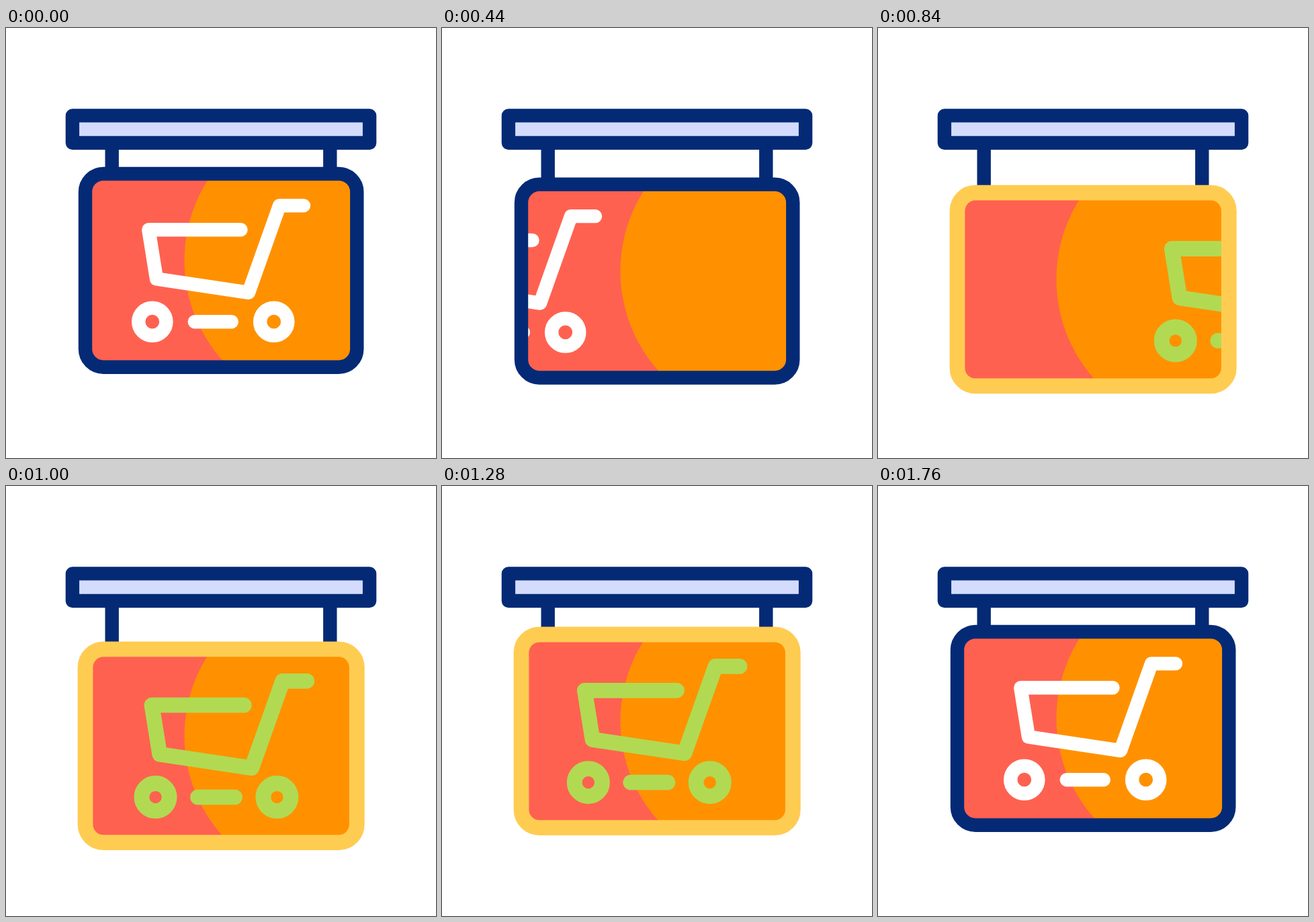
Recreate the animation shown at these times as an HTML page with a canvas. Size 640 px wide and 640 px high, loop 2160 ms.

```html
<!DOCTYPE html>
<html lang="en">
<head>
<meta charset="utf-8">
<title>Shop sign</title>
<style>
html, body { margin: 0; width: 100%; height: 100%; overflow: hidden; background: #fff; }
canvas { display: block; width: 640px; height: 640px; }
</style>
</head>
<body>
<canvas id="stage" width="640" height="640"></canvas>
<script>
const ctx = document.getElementById('stage').getContext('2d');

const LOOP = 2160, STEP = 40, LAST = 1760;
const NAVY = '#042a76', PALE = '#d4dcfd', RED = '#ff6150', ORANGE = '#ff9100';
const YELLOW = '#ffcc52', GREEN = '#b1da52', WHITE = '#fff';
const THIN = 20.4, WIDE = 22.8;
const DROP = 28.2;

const BOARD = { l: 118, t: 217, r: 522.3, b: 504.7, rad: 27, seam: 345 };
const BASKET = [[349.5, 300.3], [212.3, 300.3], [224, 373.4], [361, 393.8], [407, 264.4], [443, 264.4]];
const SHELF = [[280.8, 437.2], [335.8, 437.2]];
const WHEELS = [217.8, 398.7];

const clamp = v => Math.min(1, Math.max(0, v));
const part = (t, from, to) => clamp((t - from) / (to - from));
const smooth = u => u * u * (3 - 2 * u);

// Cubic bezier ease (.6, 0, .4, 1), solved by bisection
function ease(u) {
  let lo = 0, hi = 1;
  for (let i = 0; i < 24; i++) {
    const s = (lo + hi) / 2, q = 1 - s;
    const x = 1.8 * s * q * q + 1.2 * s * s * q + s * s * s;
    if (x < u) lo = s; else hi = s;
  }
  return smooth(lo);
}

function pen(color, width) {
  ctx.strokeStyle = color;
  ctx.lineWidth = width;
}

function line(points) {
  ctx.beginPath();
  points.forEach(([x, y]) => ctx.lineTo(x, y));
  ctx.stroke();
}

// Runs counter-clockwise from the seam on the left side
function boardPath() {
  const { l, t, r, b, rad, seam } = BOARD;
  ctx.beginPath();
  ctx.moveTo(l, seam);
  ctx.arcTo(l, b, r, b, rad);
  ctx.arcTo(r, b, r, t, rad);
  ctx.arcTo(r, t, l, t, rad);
  ctx.arcTo(l, t, l, b, rad);
  ctx.closePath();
}

function strokeBoard(color, width, amount) {
  if (amount <= 0) return;
  const { l, t, r, b, rad } = BOARD;
  const len = 2 * (r - l + b - t) - (8 - 2 * Math.PI) * rad;
  ctx.save();
  pen(color, width);
  ctx.lineCap = 'butt';
  if (amount < 1) ctx.setLineDash([len * amount, len * 2]);
  boardPath();
  ctx.stroke();
  ctx.restore();
}

function cart(color, width) {
  pen(color, width);
  line(BASKET);
  line(SHELF);
  for (const x of WHEELS) {
    ctx.beginPath();
    ctx.arc(x, 437.2, 20.6, 0, 2 * Math.PI);
    ctx.stroke();
  }
}

function hanger(drop) {
  ctx.fillStyle = NAVY;
  for (const x of [157.7, 482.3]) ctx.fillRect(x - 10.2, 171, 20.4, 40 + drop);
  ctx.fillStyle = PALE;
  ctx.fillRect(98.9, 130.4, 442.2, 40.6);
  pen(NAVY, THIN);
  ctx.strokeRect(98.9, 130.4, 442.2, 40.6);
}

function cartShift(t) {
  return t < 640 ? -430 * ease(part(t, 240, 640)) : 450 * (1 - ease(part(t, 640, 1040)));
}

function draw(t) {
  const drop = DROP * (ease(part(t, 0, 840)) - ease(part(t, 840, 1480)));
  ctx.fillStyle = WHITE;
  ctx.fillRect(0, 0, 640, 640);
  ctx.lineJoin = ctx.lineCap = 'round';
  hanger(drop);

  ctx.save();
  ctx.translate(0, drop);

  ctx.save();
  boardPath();
  ctx.clip();
  ctx.fillStyle = RED;
  ctx.fillRect(100, 200, 440, 320);
  ctx.fillStyle = ORANGE;
  ctx.beginPath();
  ctx.arc(488.5, 346, 223, 0, 2 * Math.PI);
  ctx.fill();
  ctx.translate(cartShift(t), 0);
  cart(WHITE, THIN);
  if (t >= 640) {
    ctx.globalAlpha = 1 - part(t, 1680, 1760);
    cart(GREEN, WIDE);
  }
  ctx.restore();

  strokeBoard(NAVY, THIN, 1);
  ctx.globalAlpha = 1 - part(t, 1440, 1520);
  strokeBoard(YELLOW, WIDE, smooth(part(t, 440, 840)));
  ctx.restore();
}

const start = performance.now();
function tick() {
  const t = (performance.now() - start) % LOOP;
  draw(Math.min(LAST, Math.floor(t / STEP) * STEP));
  requestAnimationFrame(tick);
}
tick();
</script>
</body>
</html>
```
